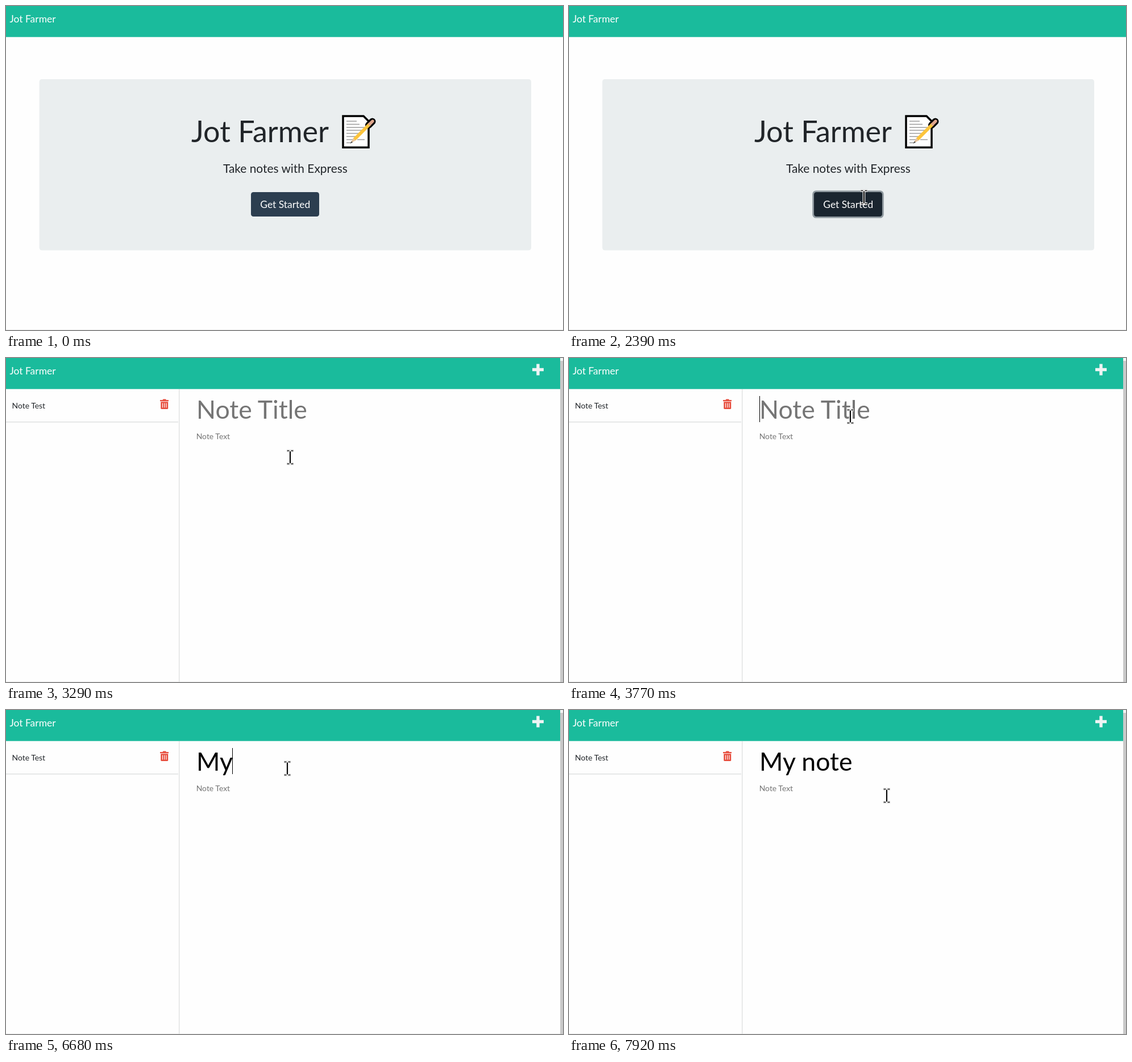
Recreate the animation shown at these times as an HTML page. Size 980 px wide and 571 px high, loop 8 s.

```html
<!DOCTYPE html>
<html lang="en">
<head>
<meta charset="utf-8">
<title>Jot Farmer</title>
<style>
  html, body { margin: 0; width: 100%; height: 100%; overflow: hidden; background: #fefefe; }
  svg { display: block; width: 980px; height: 571px; }
  text { font-family: Lato, sans-serif; fill: #212529; white-space: pre; }
  .brand, .label { font-size: 17.44px; fill: #fff; }
  .heading { font-size: 52.1px; }
  .lead { font-size: 20.9px; }
  .small { font-size: 13.95px; }
  .title { font-size: 44.64px; }
  .typed { fill: #000; }
  .middle { text-anchor: middle; }
  .hint { fill: #757575; }
</style>
</head>
<body>
<svg viewBox="0 0 980 571">
  <rect width="980" height="571" fill="#fefefe"/>
  <rect y="570" width="980" height="1" fill="#efefef"/>
  <rect width="980" height="54.7" fill="#1abb9c"/>
  <text class="brand" x="6.5" y="28.5">Jot Farmer</text>

  <g id="home">
    <rect x="58.6" y="129" width="865.4" height="301.5" rx="4.5" fill="#eaeeef"/>
    <text class="heading" x="326" y="240">Jot Farmer</text>
    <g id="memo">
      <path d="M593 194H629L638 203V249.3H593Z" fill="#fff" stroke="#000" stroke-width="3.5"/>
      <path d="M599 203H617M599 208.5H622M599 214H631M599 219H631M599 224.5H626M599 230H621M599 235.5H616M599 241H607M618 235.5H631"
        stroke="#9c9c9c" stroke-width="1.5"/>
      <path d="M638 210L644.5 203.5" stroke="#000" stroke-width="12" stroke-linecap="round"/>
      <path d="M613 235L640 208" stroke="#fcc43c" stroke-width="6"/>
      <path d="M640 208L645 203" stroke="#dfa58c" stroke-width="5.4" stroke-linecap="round"/>
      <path d="M610.9 232.9L615.1 237.1L606 242Z" fill="#e8c39b"/>
      <path d="M608 238.2L610 240.2L605.5 242.5Z" fill="#444"/>
    </g>
    <text class="lead middle" x="491.4" y="293.5">Take notes with Express</text>
    <rect id="ring" x="428.2" y="325.2" width="125.6" height="48.6" rx="6.5" fill="#8f999f"/>
    <rect id="button" x="431" y="328" width="120" height="43" rx="4.3"/>
    <text class="label middle" x="491.3" y="356">Get Started</text>
  </g>

  <g id="notes">
    <path d="M926 20.5H946M936 10.5V30.5" stroke="#eff4f4" stroke-width="5.4"/>
    <rect x="975" width="5" height="571" fill="#c9c9c9"/>
    <rect x="975" width="5" height="5" fill="#f3f3f3"/>
    <rect x="304" y="55" width="1.4" height="516" fill="#dfe1e2"/>
    <rect y="112" width="303" height="1.5" fill="#dfe1e2"/>
    <text class="small" x="10.5" y="89">Note Test</text>
    <g fill="#e74c3c">
      <path d="M271 74H275.5L276.5 72.5H281L282 74H286V76.3H271Z"/>
      <path d="M272.3 77.3H285.2V88.4Q285.2 90 283.6 90H273.9Q272.3 90 272.3 88.4Z"/>
    </g>
    <path d="M275.5 79.5V87.5M278.8 79.5V87.5M282 79.5V87.5" stroke="#fefefe" stroke-width="1.2"/>
    <text class="title hint" id="titleHint" x="335" y="107">Note Title</text>
    <text class="title typed" id="titleText" x="335" y="107"></text>
    <text class="small hint" x="334.7" y="143">Note Text</text>
    <rect id="caret" y="67" width="1" height="46"/>
  </g>

  <g id="pointer" fill="none">
    <g id="halo">
      <path id="beam" d="M-6 -11.5H-2L0 -10L2 -11.5H6M0 -10.5V10.5M-6 11.5H-2L0 10L2 11.5H6"/>
    </g>
    <use href="#beam" stroke="#c4c4c4" stroke-width="4.6"/>
    <use href="#beam" stroke="#fff" stroke-width="3.6"/>
    <path d="M-5.5 -11.5H-1.5M1.5 -11.5H5.5M-5.5 11.5H-1.5M1.5 11.5H5.5" stroke="#000" stroke-width="1.4"/>
    <path d="M0 -10.5V10.5" stroke="#000" stroke-width="2"/>
  </g>
</svg>
<script>
  const LOOP = 8000, TICK = 80;
  const ENTER = 1400, HOVER = 1800, PRESS = 2300, PAGE_CHANGE = 2470;
  const BLINK_START = 3650, BLINK = 540;
  const TYPE_START = 6430, KEY_GAP = 138, TYPE_END = 7430;
  const TITLE = 'My note', TITLE_X = 335;

  const smooth = s => s * s * (3 - 2 * s);
  const easeOut = s => 1 - (1 - s) ** 2;

  // Each move bends from the previous end point, past `via`, to `to`.
  const ORIGIN = [985, 423];
  const moves = [
    { start: ENTER, ticks: 7, via: [755, 383], to: [525, 343], ease: smooth },
    { start: 2130, ticks: 2, via: [522, 340], to: [519, 337], ease: smooth },
    { start: 3050, ticks: 9, via: [501, 220], to: [495, 103], ease: easeOut },
    { start: 7600, ticks: 5, via: [629, 62], to: [559, 151], ease: smooth }
  ];

  const el = id => document.getElementById(id);
  const [home, notes, ring, button, titleHint, titleText, caret, pointer] =
    ['home', 'notes', 'ring', 'button', 'titleHint', 'titleText', 'caret', 'pointer'].map(el);
  const show = (node, on) => { node.style.display = on ? '' : 'none'; };

  function pointerAt(t) {
    let spot = ORIGIN;
    for (const { start, ticks, via, to, ease } of moves) {
      if (t < start) break;
      const p = ease(Math.min(1, (Math.floor((t - start) / TICK) + 1) / ticks));
      spot = spot.map((from, i) =>
        (1 - p) ** 2 * from + 2 * p * (1 - p) * via[i] + p * p * to[i]);
    }
    return spot.map(Math.round);
  }

  function caretShown(t) {
    if (t >= TYPE_START) return t < TYPE_END;
    return t >= BLINK_START && Math.floor((t - BLINK_START) / BLINK) % 2 === 0;
  }

  function render(t) {
    show(home, t < PAGE_CHANGE);
    show(notes, t >= PAGE_CHANGE);

    button.setAttribute('fill', t < HOVER ? '#2c3e50' : t < PRESS ? '#1e2b37' : '#1a252f');
    show(ring, t >= PRESS);

    show(pointer, t >= ENTER);
    pointer.setAttribute('transform', `translate(${pointerAt(t)})`);

    const keys = Math.max(0, Math.floor((t - TYPE_START) / KEY_GAP) + 1);
    const typed = TITLE.slice(0, keys);
    titleText.textContent = typed;
    show(titleHint, !typed);
    show(caret, caretShown(t));
    const width = typed ? titleText.getComputedTextLength() : 0;
    caret.setAttribute('x', Math.floor(TITLE_X + width));
  }

  const start = performance.now();
  function tick() {
    render((performance.now() - start) % LOOP);
    requestAnimationFrame(tick);
  }
  tick();
</script>
</body>
</html>
```
